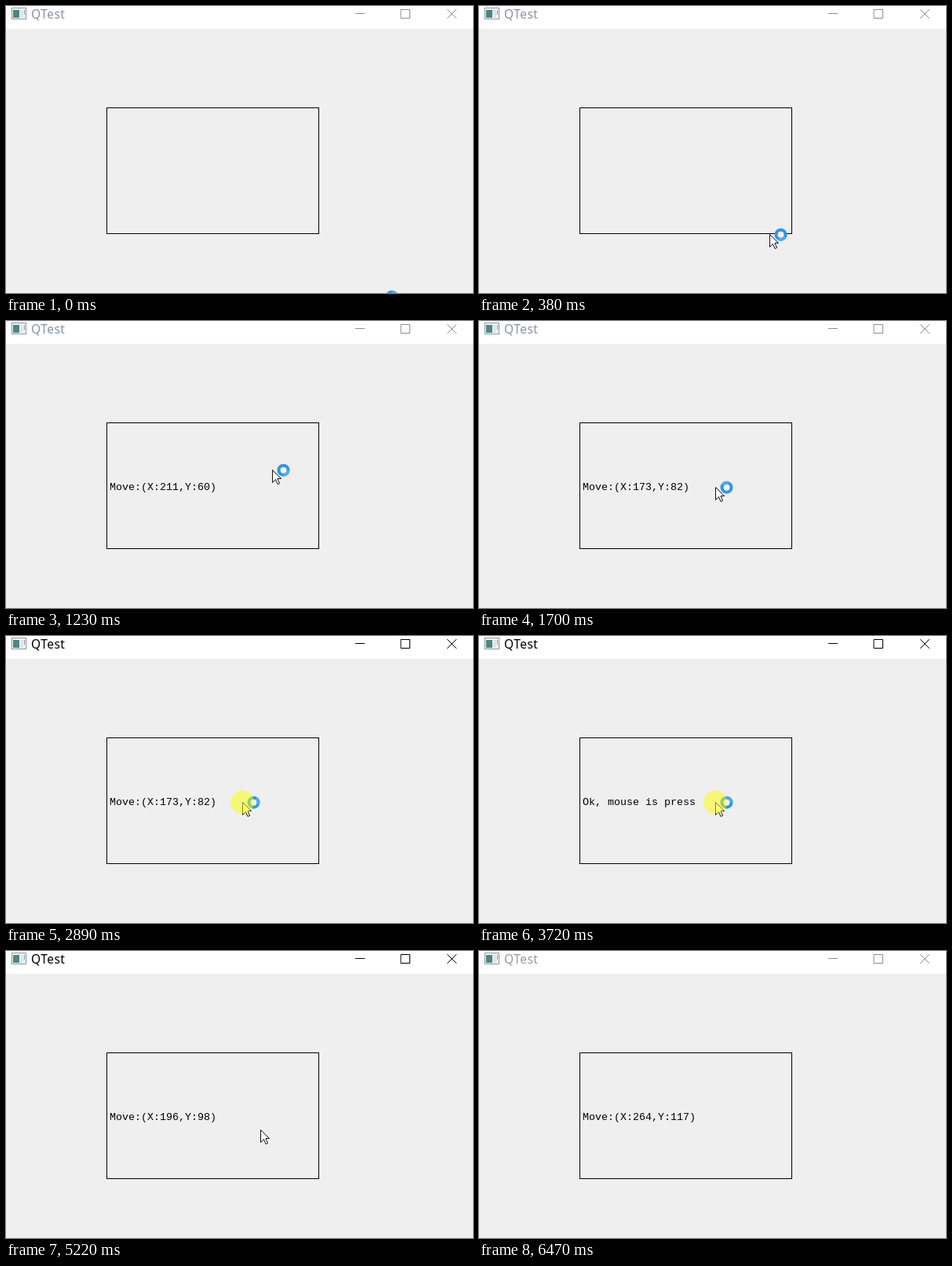
These frames come from a looping animation (595x365 px, 6.62 s). An HTML page:

```html
<!DOCTYPE html>
<html lang="en">
<head>
<meta charset="utf-8">
<title>QTest</title>
<style>
  html, body { margin: 0; width: 100%; height: 100%; overflow: hidden; background: #efefef; }
  svg { display: block; }
  #title { font: 15.5px "Noto Sans", "Open Sans", sans-serif; letter-spacing: .5px; }
  #label { font: 13.33px "Liberation Mono", "DejaVu Sans Mono", monospace; white-space: pre; }
  #buttons { fill: none; stroke-linecap: square; }
</style>
</head>
<body>
<svg width="595" height="365" viewBox="0 0 595 365">
  <rect width="595" height="365" fill="#efefef"/>
  <rect width="595" height="29" fill="#fff"/>
  <g id="icon">
    <rect x="7.5" y="2.5" width="18" height="14" fill="#f4f6f8" stroke="#8496a8"/>
    <rect x="9" y="5" width="8" height="10" fill="#4f8583"/>
    <path d="M18 5h4v10h-4z" fill="#dfe5ea"/>
    <path d="M23.5 5v6" stroke="#8496a8"/>
  </g>
  <text id="title" x="32" y="16">QTest</text>
  <g id="buttons">
    <path d="M445.5 9.5h11M503.5 4.5h11v11h-11z"/>
    <path d="M562.5 4.5l11 11M573.5 4.5l-11 11"/>
  </g>
  <rect x="128.5" y="129.5" width="270" height="160" fill="none" stroke="#000"/>
  <text id="label" x="132" y="215"></text>
  <g id="cursor">
    <g id="ring" transform="translate(14.5 .7)" fill="none" stroke-width="4">
      <circle r="4" fill="#f4f4f4"/>
      <circle r="6" stroke="#2b95ee"/>
      <path id="glint" d="M0 -6A6 6 0 0 1 6 0" stroke="#4dabf5"/>
    </g>
    <path d="M.5 .5v16l4-4 2.5 6 2.5-1-2.5-6h4.5z" fill="#fff" stroke="#111"/>
    <circle id="glow" r="15" fill="#ff0" opacity=".5"/>
  </g>
</svg>
<script>
const LOOP = 6620, STEP = 77;
const LABEL = { x: 128, y: 129, w: 270, h: 160 };
const ENTERED = 763, SETTLED = 1610, FOCUS = 2790, IDLE = 4020;
const WAKE = 4820, LEAVE = 5610, GONE = 5910, BLUR = 6470;
const presses = [[FOCUS, 3180], [3560, 4500]];

// pointer tip: corner, label, resting place, then the way out
const corner = [477, 369], inside = [262, 209], rest = [301, 211];
const edge = [392, 246], outside = [610, 380];
const hops = [[WAKE, 320, 200], [4890, 340, 192], [5220, 324, 227], [5290, 322, 253]];

const $ = id => document.getElementById(id);
const within = (t, a, b) => t >= a && t < b;
const mix = (p, q, f) => p.map((v, i) => v + (q[i] - v) * f);
const clamp = (v, max) => Math.min(max, Math.max(0, v));
const show = (id, on) => $(id).setAttribute("visibility", on ? "visible" : "hidden");
const held = t => presses.some(([a, b]) => within(t, a, b));

function path(t) {
  if (t < ENTERED) return mix(corner, inside, t / ENTERED);
  if (t < SETTLED) {
    // a slowing figure of eight on the way to the resting place
    const f = 1 - (1 - (t - ENTERED) / (SETTLED - ENTERED)) ** 2;
    const a = 2 * Math.PI * f, [x, y] = mix(inside, rest, f);
    return [x - 48 * Math.sin(a), y + 42 * Math.sin(2 * a)];
  }
  if (t < WAKE) return rest;
  if (t < LEAVE) return hops.filter(h => h[0] <= t).pop().slice(1);
  return mix(edge, outside, Math.min(1, (t - LEAVE) / (GONE - LEAVE)));
}

// the picture is renewed once per step while the pointer travels
function pointer(t) {
  const from = t < WAKE ? 0 : t < LEAVE ? t : LEAVE;
  return path(from + Math.floor((t - from + 7) / STEP) * STEP - (from ? 0 : Math.min(7, t))).map(Math.round);
}

function message(t) {
  if (t < 780) return "";
  const seen = t - (t < IDLE ? 120 : 0); // a busy program reacts late
  if (within(seen, FOCUS, WAKE)) return "Ok, mouse is " + (held(seen) ? "press" : "release");
  const [x, y] = pointer(Math.min(t, LEAVE));
  return `Move:(X:${clamp(x - LABEL.x, LABEL.w)},Y:${clamp(y - LABEL.y, LABEL.h)})`;
}

function draw(t) {
  const active = within(t, FOCUS, BLUR);
  $("title").setAttribute("fill", active ? "#000" : t < FOCUS ? "#8a93a3" : "#999");
  $("buttons").setAttribute("stroke", active ? "#000" : "#8c8c8c");
  $("label").textContent = message(t);
  $("cursor").setAttribute("transform", `translate(${pointer(t)})`);
  show("glow", held(t));
  show("ring", t < IDLE);
  $("glint").setAttribute("transform", `rotate(${Math.floor(t / STEP) * 30})`);
}

const start = performance.now();
function tick() {
  draw((performance.now() - start) % LOOP);
  requestAnimationFrame(tick);
}
tick();
</script>
</body>
</html>
```
